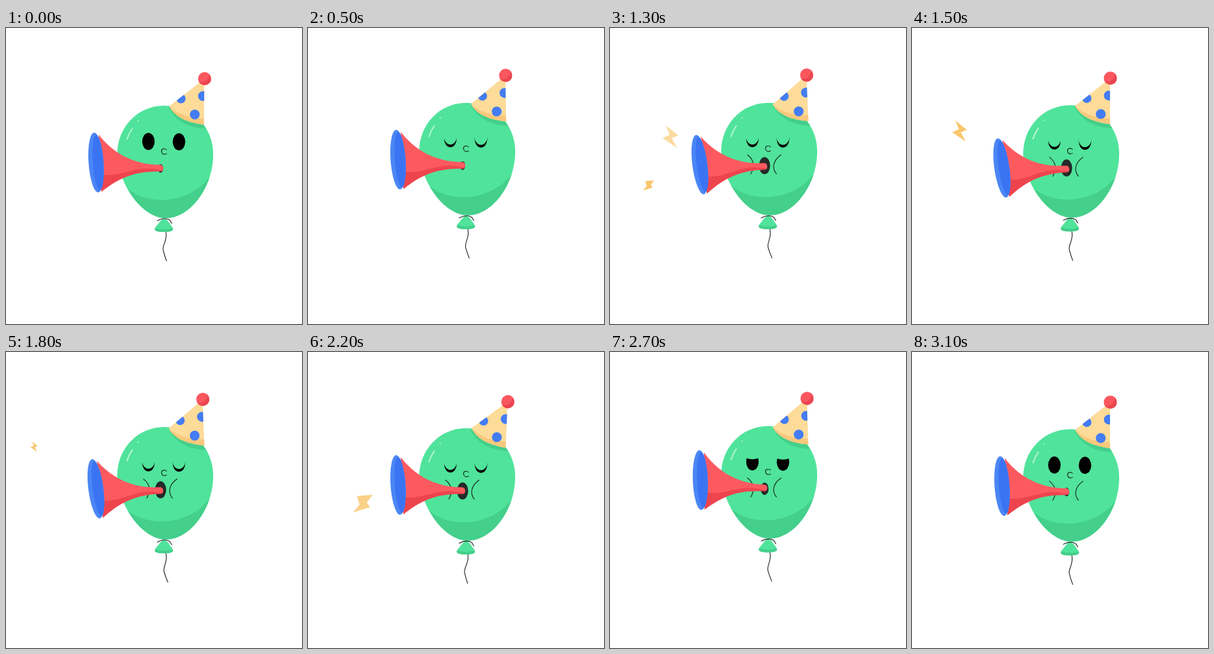
An HTML page for the animation above (3200 ms loop, 450x450 px).

```html
<!DOCTYPE html>
<html lang="en">
<head>
<meta charset="utf-8">
<title>Party balloon</title>
<style>
  html, body { margin: 0; width: 100%; height: 100%; overflow: hidden; background: #fff; }
  svg { display: block; width: 100%; height: 100%; }
  .line { fill: none; stroke: #17231e; stroke-width: 1.1; stroke-linecap: round; }
  .green { fill: #50e39b; }
  .shade { fill: #44cf8b; }
  .bolt { fill: #f9c66c; }
</style>
</head>
<body>
<svg viewBox="0 0 450 450">
  <defs>
    <path id="egg" d="M241 118C285 118 315 152 315 192C315 242 280 289 243 289C207 289 171 238 169 192C169 152 199 118 241 118Z"/>
    <path id="cone" d="M248 119L298 80H301.500L301 147Q260 142 248 119Z"/>
    <path id="tube" d="M141 162C160 187 190 208 235 208Q239 209 239 213Q239 218 235 218C194 217 170 229 145 249Z"/>
    <clipPath id="inEgg"><use href="#egg"/></clipPath>
    <clipPath id="inCone"><use href="#cone"/></clipPath>
    <clipPath id="inTube"><use href="#tube"/></clipPath>
    <clipPath id="inBall"><circle cx="302" cy="77" r="10"/></clipPath>
    <clipPath id="lid"><path id="lidEdge"/></clipPath>
  </defs>

  <path id="lowBolt" class="bolt" d="M-9 -11L15 -13L6 -1L11 6L-15 14L-5 2Z"/>
  <path id="highBolt" class="bolt" d="M-6 -17L13 -2L3 2L11 17L-11 2L0 -3Z"/>

  <g id="balloon">
    <path id="string" class="line" d="M243 310C246 323 237 330 239 338Q241 346 244 354"/>
    <path class="green" d="M236 292Q240 288 245 292L253 303Q257 310 240 310Q223 310 227 303Z"/>
    <path class="shade" d="M227 304Q240 308 253 304Q257 310 240 310Q223 310 227 304Z"/>
    <use href="#egg" class="green"/>
    <g clip-path="url(#inEgg)">
      <path class="shade" d="M165 219C190 277 287 276 318 213V295H165Z"/>
      <path class="shade" d="M247 121Q264 153 308 153V140L262 112Z"/>
    </g>
    <path class="line" d="M230 293Q241 287 249 292L252 297"/>
    <path d="M192 153Q187 160 184 169M201 141h.1" fill="none" stroke="#b4f5d4" stroke-width="2" stroke-linecap="round"/>

    <g transform="translate(216.500 172.500)"><ellipse rx="9.500" ry="13" clip-path="url(#lid)"/></g>
    <g transform="translate(263 173)"><ellipse rx="9.500" ry="13" clip-path="url(#lid)"/></g>
    <path class="line" d="M244 185C240 182 236 184 236.500 188C237 192 241 193 244 191"/>
    <path id="cheeks" class="line" d="M209 197C221 206 219 218 214 226M260 197C246 207 247 219 253 226"/>
    <ellipse id="mouth" cx="235" cy="213.500" fill="#252b2a"/>

    <g id="hat">
      <use href="#cone" fill="#fddb98"/>
      <g clip-path="url(#inCone)">
        <path d="M246 117Q266 138 304 138V150H246Z" fill="#f9c87c"/>
        <g fill="#437cf3">
          <circle cx="266" cy="107.500" r="7"/>
          <circle cx="299.500" cy="103.500" r="7.500"/>
          <circle cx="287" cy="131.500" r="7.500"/>
        </g>
      </g>
      <circle cx="302" cy="77" r="10" fill="#fb575f"/>
      <path d="M291 80Q304 88 310 70L314 90H291Z" fill="#ea4650" clip-path="url(#inBall)"/>
    </g>

    <g id="horn">
      <use href="#tube" fill="#fd5a60"/>
      <path d="M145 223C175 227 192 211 222 214L240 217V255H140Z" fill="#ee444e" clip-path="url(#inTube)"/>
      <g transform="translate(137 204.500) rotate(-4)">
        <ellipse rx="11.500" ry="45.500" fill="#4b86f5"/>
        <ellipse cx="3" rx="8" ry="42" fill="#3b74f3"/>
      </g>
    </g>
  </g>
</svg>
<script>
const LOOP = 3200, HOP = 800, STEP = 100;
const el = id => document.getElementById(id);
const place = (id, value) => el(id).setAttribute('transform', value);

const ramp = (t, from, to) => Math.min(1, Math.max(0, (t - from) / (to - from)));
const bump = (t, from, to) => Math.sin(Math.PI * ramp(t, from, to));
const mix = (a, b, k) => a + (b - a) * k;

// A bolt fades in at the bell, flies outward and shrinks away.
function flyBolt(id, age, from, to) {
  const k = ramp(age, 0, 1);
  const scale = Math.min(1, 1.7 * (1 - k));
  place(id, `translate(${mix(from.x, to.x, k)} ${mix(from.y, to.y, k)}) scale(${scale})`);
  el(id).setAttribute('opacity', Math.min(1, 2.4 * k));
}

function draw(t) {
  // Quick rise, slower fall; the hat and string sway further on every second landing.
  const hop = Math.sin(Math.PI * (t % HOP / HOP) ** .85) ** 2;
  const tilt = 6.5 * Math.sin(Math.PI * t / (2 * HOP)) ** 8 - 4 * hop;
  place('balloon', `translate(0 ${-5.8 * hop})`);
  place('hat', `rotate(${tilt} 277 135)`);
  place('string', `rotate(${tilt} 243 310)`);

  const hornTurn = 2.5 * bump(t, 2200, 2900) - 4.2 * bump(t, 900, 2200) - 4 * bump(t, 2900, 3100);
  place('horn', `rotate(${hornTurn} 260 213)`);

  const blow = ramp(t, 700, 1000) - ramp(t, 2200, 3100);
  el('mouth').setAttribute('rx', mix(4, 8.5, blow));
  el('mouth').setAttribute('ry', mix(6.5, 13, blow));
  el('cheeks').setAttribute('opacity', t >= 700 ? 1 : 0);

  const closed = ramp(t, 100, 400) - ramp(t, 2500, 2840);
  const side = mix(-14, -3, Math.sqrt(closed)), middle = mix(-14, 13, closed);
  el('lidEdge').setAttribute('d', `M-10 ${side}C-8 ${middle} 8 ${middle} 10 ${side}V14H-10Z`);

  const lowStart = t < 2000 ? 900 : 2000;
  flyBolt('lowBolt', (t - lowStart) / 600, { x: 108, y: 221 }, { x: 34, y: 248 });
  flyBolt('highBolt', (t - 1000) / 1100, { x: 120, y: 178 }, { x: 13, y: 131 });
}

const start = performance.now();
function tick() {
  const t = (performance.now() - start) % LOOP;
  draw(Math.floor(t / STEP) * STEP);
  requestAnimationFrame(tick);
}
tick();
</script>
</body>
</html>
```
